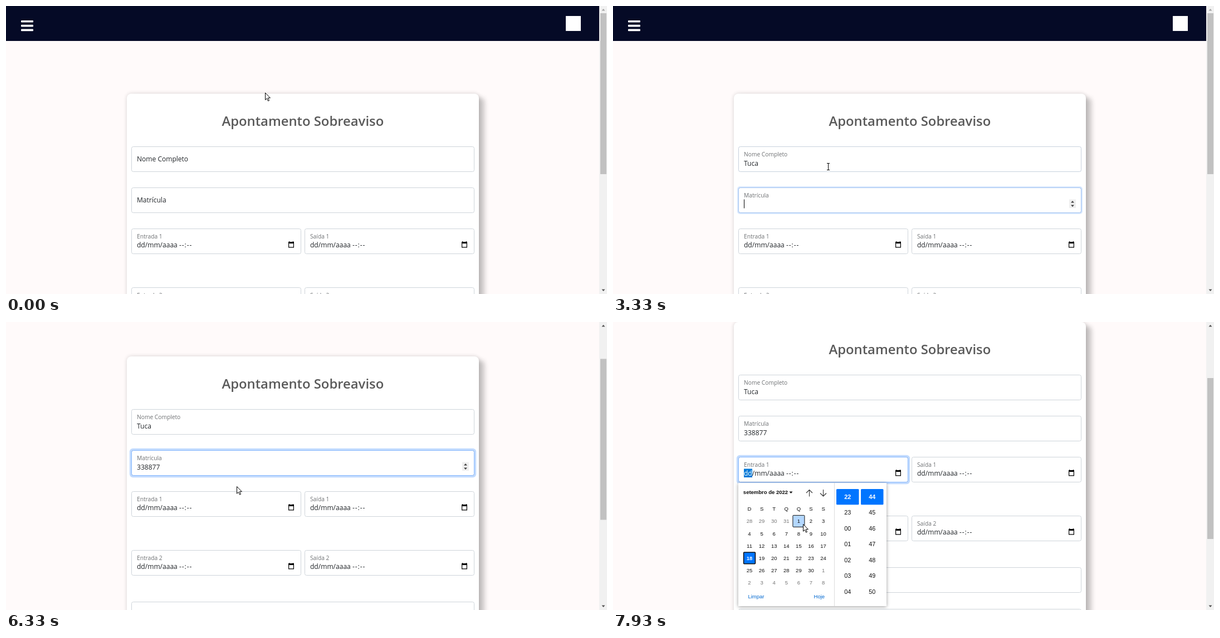
Write an HTML page that moves like this. It is 1079 px wide and 519 px high and loops after 8000 ms.

```html
<!DOCTYPE html>
<html lang="pt-BR">
<head>
<meta charset="utf-8">
<title>Apontamento Sobreaviso</title>
<style>
  html, body { margin: 0; width: 100%; height: 100%; overflow: hidden; background: #fffafa; }
  #stage { position: relative; width: 1079px; height: 519px; overflow: hidden; }
  #page { position: absolute; inset: 0; }
  #nav { position: absolute; width: 1065px; height: 63px; background: #050a26; }
  #card { position: absolute; left: 217px; top: 158px; width: 632px; height: 760px; border-radius: 8px;
    background: #fff; box-shadow: 10px 7px 8px rgba(0, 0, 0, .21), 0 0 7px rgba(0, 0, 0, .16); }
  svg { position: absolute; left: 0; top: 0; overflow: visible; }
  text { font: 12.04px "Open Sans", "Noto Sans", sans-serif; fill: #212529; white-space: pre; }
  .title { font-size: 23.85px; font-weight: 600; fill: #5a5a5a; text-anchor: middle; }
  .box { fill: #fff; stroke: #ced4da; }
  .blue { fill: none; stroke: #86b7fe; }
  .ring { fill: #c2dbfe; }
  #picker { filter: drop-shadow(0 1px 3px rgba(0, 0, 0, .4)); }
  #picker text { font: 9.5px "Liberation Sans", Arial, sans-serif; fill: #101010; text-anchor: middle; }
  #picker .bold { font-weight: bold; }
  #picker .dim { fill: #757575; }
  #picker .sel { fill: #fff; font-weight: bold; }
  #picker .link { fill: #0068d0; }
  #picker .time { font-size: 10.8px; }
</style>
</head>
<body>
<div id="stage">
  <div id="page">
    <div id="nav"></div>
    <div id="card"></div>
    <svg width="1079" height="519">
      <g fill="#fff">
        <rect x="27" y="26" width="22" height="3.6" rx="1"/>
        <rect x="27" y="33.8" width="22" height="3.6" rx="1"/>
        <rect x="27" y="41.6" width="22" height="3.6" rx="1"/>
        <rect x="1005" y="18" width="27" height="27"/>
      </g>
      <text class="title" x="532.8" y="216">Apontamento Sobreaviso</text>
      <g id="form"></g>
    </svg>
  </div>
  <svg width="1079" height="519">
    <rect x="1065" width="14" height="519" fill="#f1f1f1"/>
    <rect id="thumb" x="1067" y="13" width="11" height="290" fill="#c1c1c1"/>
    <path id="up" d="M1069.5 8.5h6l-3-3.5z"/>
    <path d="M1069.5 510.5h6l-3 3.5z" fill="#505050"/>
    <g id="picker"></g>
    <path id="arrow" d="M.5 .5V13.2L3.4 10.5L5.5 15.2L7.5 14.3L5.4 9.7H9.4Z" fill="#fff" stroke="#000"/>
    <g id="ibeam" fill="none">
      <path d="M-3 -6H3M0 -6V6M-3 6H3" stroke="#fff" stroke-width="2.4" opacity=".7"/>
      <path d="M-2.5 -6H2.5M0 -6V6M-2.5 6H2.5" stroke="#000"/>
    </g>
  </svg>
</div>
<script>
const LOOP = 8000, FRAME = 200 / 3, SCROLL = 158, BLINK = 530;
const $ = id => document.getElementById(id);

function add(parent, tag, attrs, text) {
  const el = document.createElementNS("http://www.w3.org/2000/svg", tag);
  set(el, attrs);
  if (text !== undefined) el.textContent = text;
  parent.append(el);
  return el;
}
function set(el, attrs) {
  for (const k in attrs) el.setAttribute(k, attrs[k]);
}
const show = (el, on) => { el.style.display = on ? "" : "none"; };
const ease = (t, start, span) => {
  const u = Math.min(1, Math.max(0, (t - start) / span));
  return u * u * (3 - 2 * u);
};

// Form fields
const form = $("form");

function field(x, y, w, label) {
  const ring = add(form, "rect", { class: "ring" });
  const rect = { x: x + .5, y: y + .5, width: w - 1, height: 45, rx: 3 };
  add(form, "rect", { class: "box", ...rect });
  const blue = add(form, "rect", { class: "blue", ...rect });
  const name = add(form, "text", {}, label);
  const value = add(form, "text", { x: x + 10, y: y + 34.8 });
  const f = {
    x, y, value,
    focus(k) {
      const d = 3.2 * k;
      set(blue, { opacity: k });
      set(ring, { opacity: k, x: x - d, y: y - d, width: w + 2 * d, height: 46 + 2 * d, rx: 3 + d });
    },
    float(k) {
      set(name, {
        transform: `translate(${x + 10} ${y + 27.3 - 8.9 * k}) scale(${1 - .15 * k})`,
        opacity: 1 - .35 * k
      });
    }
  };
  f.focus(0);
  f.float(0);
  return f;
}

function dateField(x, y, label) {
  const f = field(x, y, 305, label), base = y + 34;
  f.float(1);
  f.mark = add(form, "rect", { x: x + 10, y: y + 21.5, width: 15, height: 15.5, fill: "#0078d7" });
  show(f.mark, false);
  f.day = add(form, "text", { x: x + 10, y: base }, "dd");
  add(form, "text", { x: x + 24.8, y: base }, "/mm/aaaa");
  add(form, "text", { x: x + 86, y: base, "letter-spacing": .9 }, "--:--");
  add(form, "path", {
    d: `M${x + 282} ${y + 24}h1v-1h1.2v1h5.6v-1h1.2v1h1v10.5h-10zm1.2 3v6.2h7.6v-6.2z`,
    "fill-rule": "evenodd", fill: "#000"
  });
  return f;
}

const fullName = field(225, 253, 616, "Nome Completo");
const badge = field(225, 327, 616, "Matrícula");
const entry = dateField(225, 401, "Entrada 1");
dateField(536, 401, "Saída 1");
dateField(225, 507, "Entrada 2");
dateField(536, 507, "Saída 2");
field(225, 600, 616, "Nome Gestor");
field(225, 675, 616, "");

const spinner = add(form, "g", {});
add(spinner, "rect", { x: 819, y: 348.5, width: 12, height: 15.5, fill: "#efefef" });
add(spinner, "path", { d: "M822 354.5h6l-3-3.5zM822 358.5h6l-3 3.5z", fill: "#404040" });
const caret = add(form, "rect", { width: 1, height: 16, fill: "#000" });

// Date and time picker
const picker = $("picker");
const COL = 22.1, ROW = 22.15;
add(picker, "rect", { x: 225, y: 290, width: 266, height: 222, fill: "#fff" });
add(picker, "path", { d: "M397.5 290V512", stroke: "#dcdcdc" });
add(picker, "text", { x: 274, y: 310.3, class: "bold" }, "setembro de 2022");
add(picker, "path", { d: "M316.5 305.5h6l-3 3.5z", fill: "#101010" });
add(picker, "path", {
  d: "M352.5 314.5V302.5M347 308l5.5-5.5l5.5 5.5M377.5 302V314M372 308.5l5.5 5.5l5.5-5.5",
  fill: "none", stroke: "#303030", "stroke-width": 1.1
});
[..."DSTQQSS"].forEach((d, i) => add(picker, "text", { x: 245 + i * COL, y: 339.5 }, d));
const hover = add(picker, "rect", { width: 21, height: 21, rx: 1, fill: "#b3d7ff", stroke: "#101010" });
add(picker, "rect", { x: 234.6, y: 415, width: 20.8, height: 20.8, rx: 1, fill: "#0075ff", stroke: "#101010", "stroke-width": 1.6 });
for (let i = 0; i < 42; i++) {
  const n = i - 3;
  const day = n < 1 ? n + 31 : n > 30 ? n - 30 : n;
  add(picker, "text", {
    x: 245 + i % 7 * COL, y: 362.4 + Math.floor(i / 7) * ROW,
    class: n !== day ? "dim" : n === 18 ? "sel" : ""
  }, day);
}
add(picker, "text", { x: 257, y: 497.6, class: "link" }, "Limpar");
add(picker, "text", { x: 370.3, y: 497.6, class: "link" }, "Hoje");
for (const [x, first, size] of [[401, 22, 24], [445, 44, 60]]) {
  add(picker, "rect", { x, y: 301, width: 40.5, height: 28.3, rx: 1.5, fill: "#0075ff" });
  for (let i = 0; i < 7; i++)
    add(picker, "text", { x: x + 20.2, y: 319 + i * 28.45, class: i ? "time" : "time sel" },
      String((first + i) % size).padStart(2, "0"));
}

// Keystrokes: time, name text, badge text
const KEYS = [
  [735, "", ""], [1465, "T", ""], [1665, "Tu", ""], [2399, "Tuc", ""], [2532, "Tuca", ""],
  [3265, "Tuca", ""], [4199, "Tuca", "3"], [4332, "Tuca", "33"], [4665, "Tuca", "338"],
  [4799, "Tuca", "3388"], [5599, "Tuca", "33887"], [5799, "Tuca", "338877"]
];
// Pointer: time, x, y, text cursor
const PATH = [
  [0, 465, 156, 0], [30, 465, 156, 0], [330, 405, 255, 1], [533, 386.5, 289.5, 1],
  [5950, 386.5, 289.5, 1], [6200, 389, 292.5, 1], [6300, 405, 295, 0], [6466, 450, 298, 0],
  [6800, 498, 276, 0], [6980, 509, 268, 0], [7110, 509, 268, 0], [7333, 491, 280, 0],
  [7550, 491, 280, 0], [7930, 341, 364, 0]
];
const TAB = 3245, CLICK = 6980, OPEN = 7110;

function pointer(t) {
  const i = PATH.findLastIndex(p => p[0] <= t);
  const a = PATH[i], b = PATH[i + 1] || a;
  const u = b === a ? 0 : (t - a[0]) / (b[0] - a[0]);
  return { x: a[1] + (b[1] - a[1]) * u, y: a[2] + (b[2] - a[2]) * u, text: a[3] };
}

function draw(t) {
  const scroll = Math.round(SCROLL * ease(t, 6150, 320));
  $("page").style.transform = `translateY(${-scroll}px)`;
  $("thumb").setAttribute("y", 13 + scroll * .557);
  $("up").setAttribute("fill", scroll ? "#505050" : "#a3a3a3");

  const key = KEYS.findLast(k => k[0] <= t);
  fullName.value.textContent = key ? key[1] : "";
  badge.value.textContent = key ? key[2] : "";
  fullName.float(ease(t, 760, 90));
  badge.float(ease(t, TAB - 5, 90));
  fullName.focus(ease(t, 760, 150) - ease(t, TAB - 35, 150));
  badge.focus(ease(t, TAB, 150) - ease(t, CLICK, 150));
  entry.focus(ease(t, CLICK, 150));

  const picking = t >= CLICK;
  show(entry.mark, picking);
  entry.day.style.fill = picking ? "#fff" : "";
  show(spinner, t >= TAB && !picking);

  const blinkOn = key && !picking && Math.floor((t - key[0]) / BLINK) % 2 === 0;
  show(caret, blinkOn);
  if (blinkOn) {
    const f = t < TAB ? fullName : badge;
    const w = f.value.textContent ? f.value.getComputedTextLength() : 0;
    set(caret, { x: Math.round(f.x + 10 + w), y: f.y + 21.5 });
  }

  const p = pointer(t);
  show($("arrow"), !p.text);
  show($("ibeam"), p.text);
  $("arrow").setAttribute("transform", `translate(${Math.round(p.x)} ${Math.round(p.y)})`);
  $("ibeam").setAttribute("transform", `translate(${Math.floor(p.x) + .5} ${Math.floor(p.y) + .5})`);

  show(picker, t >= OPEN);
  const col = Math.floor((p.x - 234) / COL), row = Math.floor((p.y - 348) / ROW);
  show(hover, col >= 0 && col < 7 && row >= 0 && row < 6);
  set(hover, { x: 234.5 + col * COL, y: 348.4 + row * ROW });
}

const start = performance.now();
function tick() {
  const t = (performance.now() - start) % LOOP;
  draw(Math.floor((t + 6) / FRAME) * FRAME);
  requestAnimationFrame(tick);
}
draw(0);
requestAnimationFrame(tick);
</script>
</body>
</html>
```
